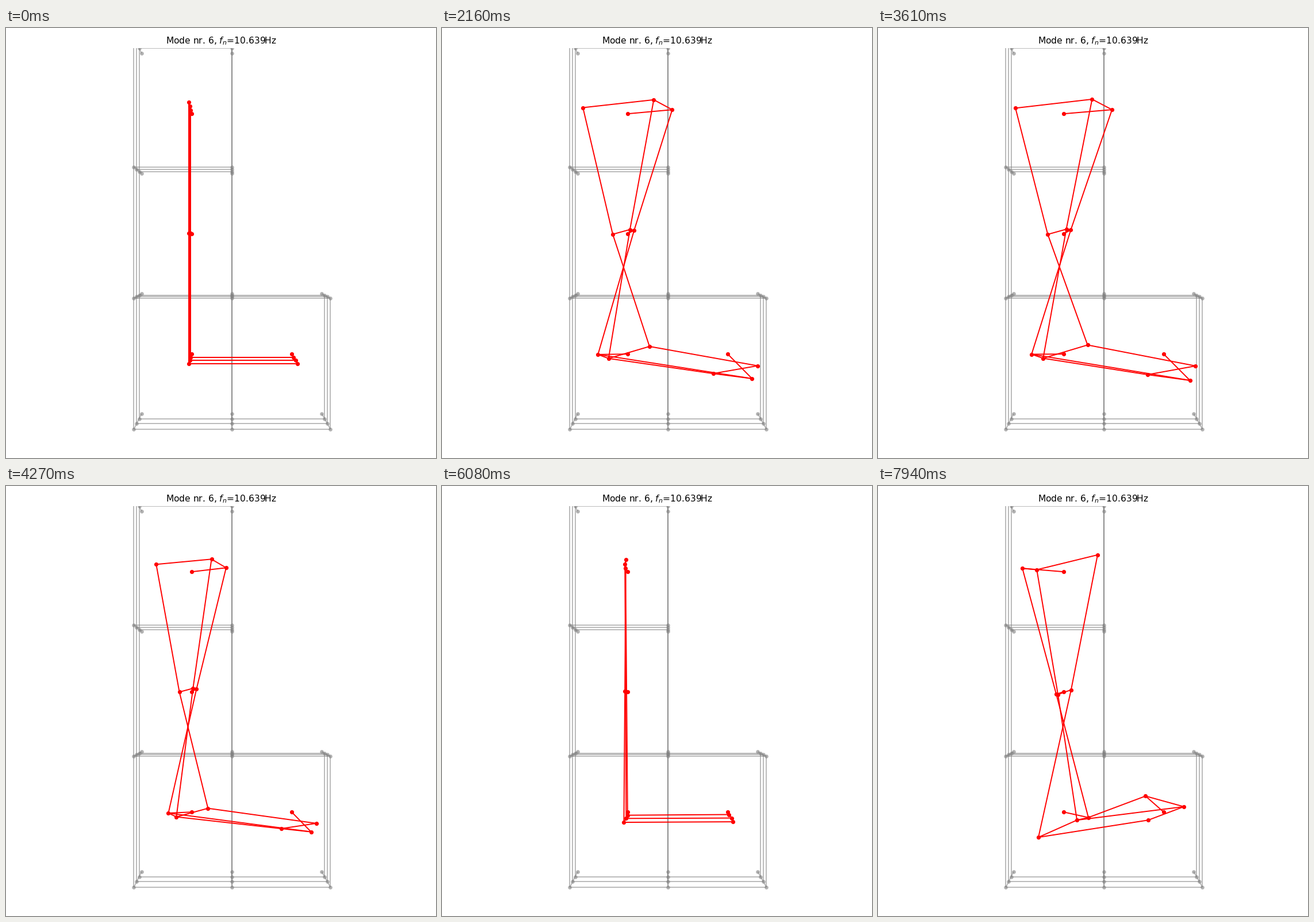
A matplotlib script for the animation above (8000 ms loop, 748 px wide and 748 px high).

```python
import numpy as np
import matplotlib.pyplot as plt
from matplotlib.animation import FuncAnimation
from matplotlib.collections import LineCollection

SIZE, DPI = 748, 100
PX = 72 / DPI            # one pixel in points
TOP = 35                 # upper edge of the drawing area
LOOP, TICK = 8000, 20
QUARTER, STEP, LAST = 3010, 60, 49
DEPTH = np.array([0, 0.352, 0.685, 1])   # perspective spacing of the four layers


def layers(near, far):
    """Four points from the front layer to the back one."""
    near, far = np.array(near, float), np.array(far, float)
    return near + DEPTH[:, None] * (far - near)


def build_edges(nodes, links):
    """Depth chains at every node, plus links within the three front layers."""
    edges = [(name, k, name, k + 1) for name in nodes for k in range(3)]
    edges += [(a, k, b, k) for a, b in links for k in range(3)]
    return edges


def segments(nodes, edges):
    return [(nodes[a][i], nodes[b][j]) for a, i, b, j in edges]


frame_nodes = {
    "left0": layers((222.5, 698), (235.8, 671)),
    "mid0": layers((393.3, 698), (392.6, 671)),
    "right0": layers((564.3, 698), (549.4, 671)),
    "left1": layers((222.5, 470), (235.8, 462.3)),
    "mid1": layers((393.3, 470), (392.6, 462.3)),
    "right1": layers((564.3, 470), (549.4, 462.3)),
    "left2": layers((222.5, 242), (235.8, 253.2)),
    "mid2": layers((393.3, 242), (392.6, 253.2)),
    "left3": layers((222.5, 14), (235.8, 44.2)),
    "mid3": layers((393.3, 14), (392.6, 44.2)),
}
frame_links = [
    ("left0", "mid0"), ("mid0", "right0"), ("left1", "mid1"), ("mid1", "right1"),
    ("left2", "mid2"), ("left3", "mid3"),
    ("left0", "left1"), ("left1", "left2"), ("left2", "left3"),
    ("mid0", "mid1"), ("mid1", "mid2"), ("mid2", "mid3"), ("right0", "right1"),
]

rest = {
    "top": layers((317.6, 128.6), (323.2, 149.2)),
    "waist": layers((317.6, 356.6), (323.2, 357.7)),
    "foot": layers((317.6, 584.2), (323.2, 567.2)),
    "toe": layers((507.2, 584.2), (497, 567.2)),
}
# displacement of each layer at full amplitude; the back layer is fixed
shape = {
    "top": np.array([(-98.6, 13.5), (66.4, -15), (107.6, -0.8), (0, 0)]),
    "waist": np.array([(-28, 3), (10, -8.7), (17.4, -7.4), (0, 0)]),
    "foot": np.array([(59, -41.2), (-40.6, -4.6), (-68.2, -6.3), (0, 0)]),
    "toe": np.array([(56.8, 4.6), (-43.6, 31.2), (53.3, 50.8), (0, 0)]),
}
mode_edges = build_edges(rest, [("top", "waist"), ("waist", "foot"), ("foot", "toe")])


def amplitude(t):
    quarter, r = divmod(t, QUARTER)
    k = min(r // STEP, LAST) / LAST
    return (k, 1 - k, -k)[quarter]


fig = plt.figure(figsize=(SIZE / DPI, SIZE / DPI), dpi=DPI, facecolor="white")
ax = fig.add_axes([0, 0, 1, 1 - TOP / SIZE])
ax.set_xlim(0, SIZE)
ax.set_ylim(SIZE, TOP)
ax.axis("off")
fig.text(0.5, 1 - 27 / SIZE, "Mode nr. 6, $f_n$=10.639Hz", ha="center",
         va="baseline", fontsize=15.58 * PX, family="DejaVu Sans")

frame_edges = build_edges(frame_nodes, frame_links)
ax.add_collection(LineCollection(segments(frame_nodes, frame_edges), colors="gray",
                                 alpha=0.55, linewidths=1.9 * PX, zorder=1))
ax.scatter(*np.vstack(list(frame_nodes.values())).T, s=(6.6 * PX) ** 2, c="gray",
           alpha=0.6, linewidths=0, zorder=2)

bars = LineCollection([], colors="red", linewidths=1.95 * PX, zorder=3)
ax.add_collection(bars)
joints, = ax.plot([], [], "o", color="red", ms=7.2 * PX, mew=0, zorder=4)


def update(i):
    a = amplitude(i * TICK + TICK // 2)
    pose = {name: rest[name] + a * shape[name] for name in rest}
    bars.set_segments(segments(pose, mode_edges))
    joints.set_data(*np.vstack(list(pose.values())).T)
    return bars, joints


anim = FuncAnimation(fig, update, frames=LOOP // TICK, interval=TICK,
                     repeat=True, repeat_delay=0)
plt.show()
```
